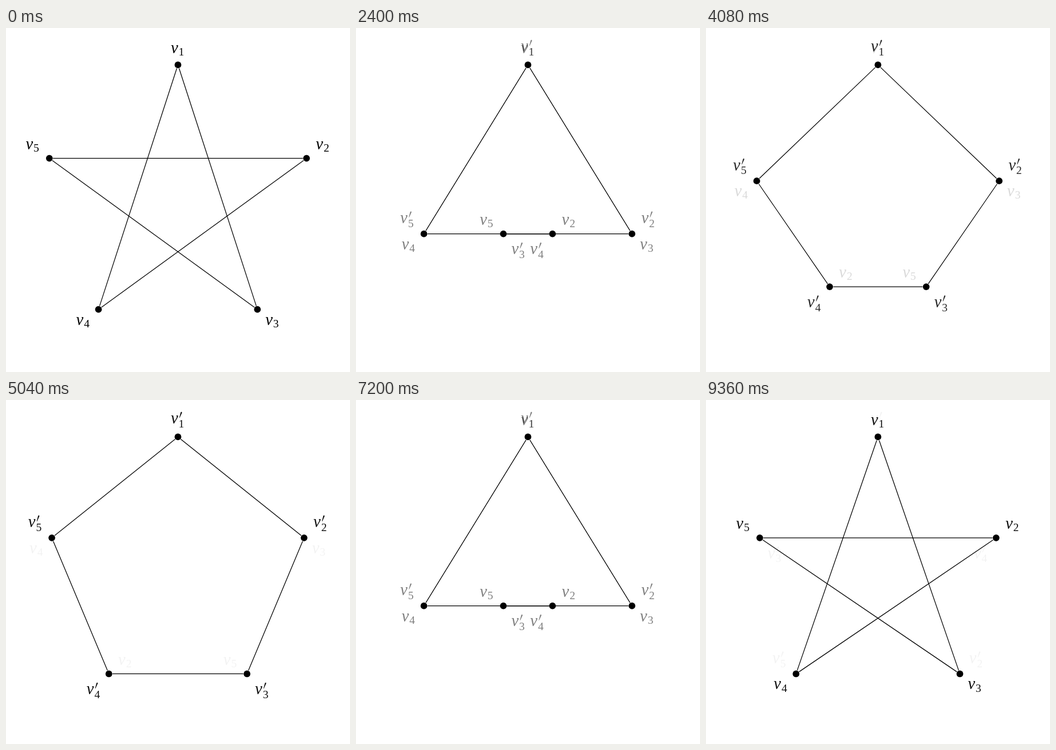
An HTML page with a canvas that plays this animation: 601 px wide and 601 px high, repeating every 9.6 s.

```html
<!DOCTYPE html>
<html lang="en">
<head>
<meta charset="utf-8">
<title>Pentagram to pentagon</title>
<style>
  html, body { margin: 0; width: 100%; height: 100%; overflow: hidden; background: #fff; }
  canvas { display: block; }
</style>
</head>
<body>
<canvas id="stage" width="601" height="601"></canvas>
<script>
const ctx = document.getElementById("stage").getContext("2d");

const STEP = 240, HALF = 20;
const PT = 200 / 72.27;                 // pixels per point
const CENTER = { x: 300.4, y: 300.6 }, RADIUS = 236.2;
const DOT = 5.87, EDGE_GAP = 6.42;
const LABEL_GAP = 9.77;
const LABEL_WIDTH = 9.33 * PT;
const LETTER_WIDTH = 4.85 * PT, DIGIT_WIDTH = 3.98 * PT;

const TARGET = [0, 3, 1, 4, 2];         // corner each vertex travels to
const SIDES = [[0, 2], [2, 4], [4, 1], [1, 3], [3, 0]];

const direction = i => {
  const a = i * Math.PI * 2 / 5;
  return { x: Math.sin(a), y: -Math.cos(a) };
};
const corner = i => {
  const d = direction(i);
  return { x: CENTER.x + RADIUS * d.x, y: CENTER.y + RADIUS * d.y };
};
const mix = (a, b, p) => ({ x: a.x + (b.x - a.x) * p, y: a.y + (b.y - a.y) * p });

function drawSide(a, b) {
  const dx = b.x - a.x, dy = b.y - a.y;
  const k = EDGE_GAP / Math.hypot(dx, dy);
  ctx.beginPath();
  ctx.moveTo(a.x + dx * k, a.y + dy * k);
  ctx.lineTo(b.x - dx * k, b.y - dy * k);
  ctx.stroke();
}

function drawDot(p) {
  ctx.beginPath();
  ctx.arc(p.x, p.y, DOT, 0, Math.PI * 2);
  ctx.fill();
}

function drawPrime(x, y) {
  ctx.beginPath();
  ctx.moveTo(x + 0.1, y - 10.6);
  ctx.lineTo(x + 2.5, y - 19.6);
  ctx.quadraticCurveTo(x + 3.1, y - 21, x + 4.3, y - 20.5);
  ctx.quadraticCurveTo(x + 5.2, y - 19.8, x + 4.6, y - 18.7);
  ctx.lineTo(x + 0.8, y - 10.3);
  ctx.fill();
}

// Places the text box beside its dot, on the outward side of its corner.
function drawLabel(dot, index, primed, alpha) {
  if (alpha <= 0) return;
  const d = direction(index);
  const side = index === 0 ? 0 : Math.sign(d.x);
  const drop = (primed ? 2.47 : 1.5) * PT;
  const rise = (primed ? 7.52 : 4.31) * PT;
  const edgeX = dot.x + d.x * EDGE_GAP + side * LABEL_GAP;
  const x = edgeX + (side - 1) / 2 * LABEL_WIDTH;
  const edgeY = dot.y + d.y * EDGE_GAP;
  const y = d.y < 0 ? edgeY - LABEL_GAP - drop : edgeY + LABEL_GAP + rise;

  ctx.globalAlpha = alpha;
  ctx.font = "italic 28.5px 'Liberation Serif', serif";
  ctx.fillText("v", x + LETTER_WIDTH / 2, y);
  ctx.font = "19.5px 'Liberation Serif', serif";
  ctx.fillText(index + 1, x + LETTER_WIDTH + DIGIT_WIDTH / 2, y + drop);
  if (primed) drawPrime(x + 15.2, y);
  ctx.globalAlpha = 1;
}

function draw(time) {
  const step = Math.floor(time / STEP) % (2 * HALF);
  const p = 1 - Math.abs(step - HALF) / HALF;
  const dots = TARGET.map((to, from) => mix(corner(from), corner(to), p));

  ctx.fillStyle = "#fff";
  ctx.fillRect(0, 0, 601, 601);
  ctx.fillStyle = ctx.strokeStyle = "#000";
  ctx.lineWidth = 1.25;
  ctx.textAlign = "center";
  SIDES.forEach(([a, b]) => drawSide(dots[a], dots[b]));
  dots.forEach((dot, i) => {
    drawDot(dot);
    drawLabel(dot, i, false, 1 - p);
    drawLabel(dot, TARGET[i], true, p);
  });
}

function loop(time) {
  draw(time);
  requestAnimationFrame(loop);
}
draw(0);
requestAnimationFrame(loop);
</script>
</body>
</html>
```
